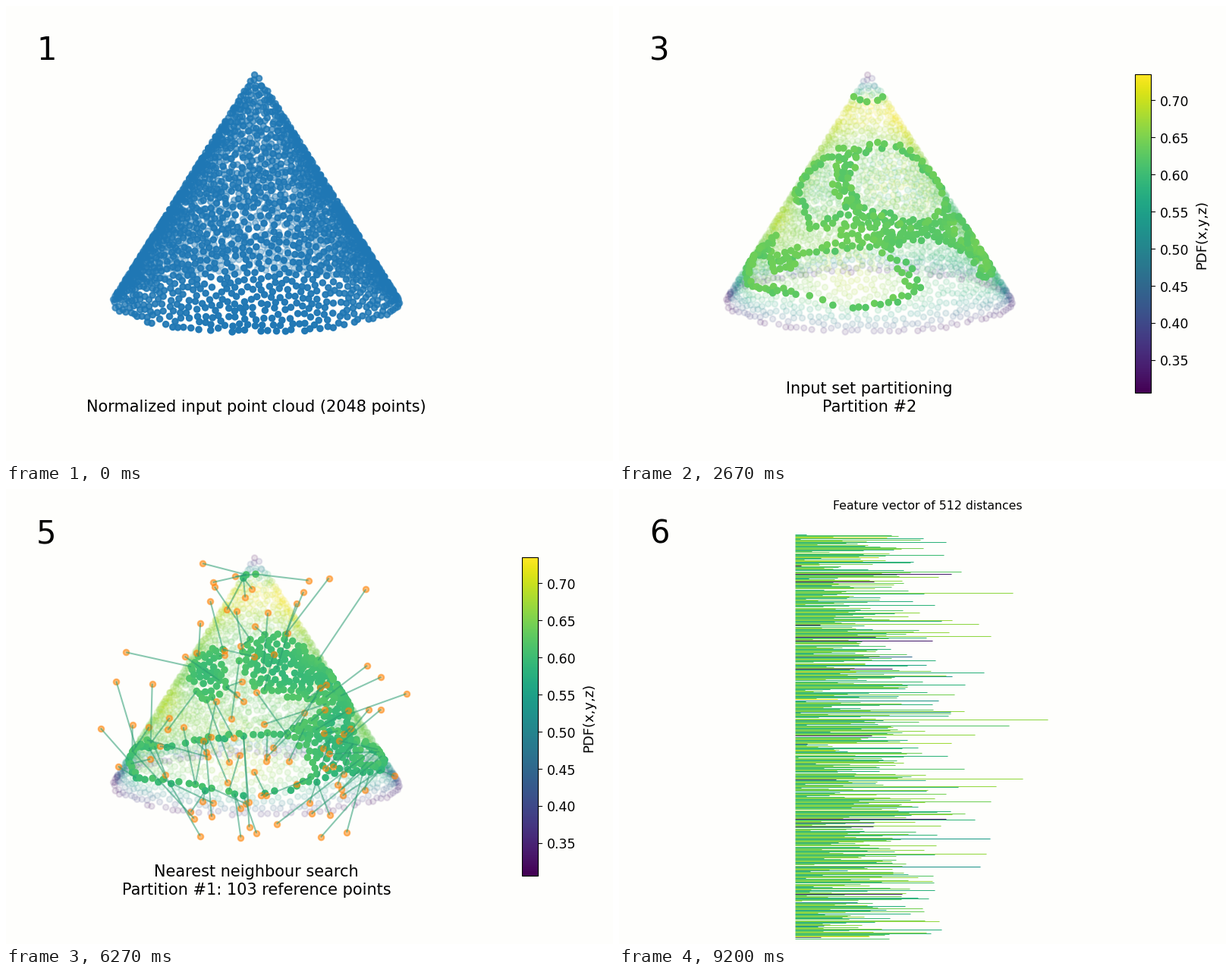
A matplotlib script that plays this animation: 800 by 600 pixels, repeating every 9270 ms.

```python
import numpy as np
import matplotlib.pyplot as plt
from matplotlib.animation import FuncAnimation
from matplotlib.collections import LineCollection
from matplotlib.colors import Normalize, to_rgba
from matplotlib.patches import Rectangle

W, H, DPI = 800, 600, 100
FRAMES, INTERVAL = 206, 45
BACKGROUND = "#fefefc"
ORANGE = "#ff860c"
plt.rcParams["font.family"] = "DejaVu Sans"

N_POINTS, N_REFS, N_PARTS = 2048, 512, 5
SCALE, CENTER = 217, (329.5, 293)
ELEV = np.radians(12.2)
RADIUS, APEX_Z, BASE_Z = 0.872, 0.968, -0.462
MIN_GAP = 0.035
PDF_MIN, PDF_MAX = 0.306, 0.735
DOT = dict(s=29, linewidths=1.5)

# When each scene begins (ms): input, density, partitions, references, searches, features
STARTS = [0, 800, 1420, 2030, 2640, 3250, 3860, 4530,
          5600, 6200, 6800, 7400, 8000, 8600]

# Denser and thinner spots on the cone: angle (deg), share of height below apex, gain, size
SPOTS = [(20, 0.20, 0.08, 0.16), (63, 0.52, 0.08, 0.18), (100, 0.74, 0.10, 0.18),
         (164, 0.65, 0.08, 0.16), (12, 0.77, 0.06, 0.10), (134, 0.50, -0.06, 0.22),
         (32, 0.68, -0.08, 0.18), (250, 0.70, 0.04, 0.22), (295, 0.55, -0.05, 0.25)]

cmap = plt.get_cmap("viridis")
norm = Normalize(PDF_MIN, PDF_MAX)
rng = np.random.default_rng(12)


def cone(angle, share):
    """Point on the side of the cone; x right, y towards the viewer, z up."""
    r = RADIUS * share
    z = APEX_Z + (BASE_Z - APEX_Z) * share
    return np.stack([r * np.cos(angle), r * np.sin(angle), z], axis=-1)


def project(p):
    x, y, z = p.T
    up = z * np.cos(ELEV) - y * np.sin(ELEV)
    return np.column_stack([CENTER[0] + SCALE * x, CENTER[1] - SCALE * up])


def depth(p):
    return p[:, 1] * np.cos(ELEV) + p[:, 2] * np.sin(ELEV)


def sq_dist(a, b):
    d = (a ** 2).sum(1)[:, None] + (b ** 2).sum(1) - 2 * a @ b.T
    return np.maximum(d, 0)


def sample_cone():
    """Random points on the cone that keep a small gap, ordered back to front."""
    kept = np.full((N_POINTS, 3), 9.0)
    n = 0
    while n < N_POINTS:
        p = cone(2 * np.pi * rng.random(), np.sqrt(rng.random()))
        if ((kept[:n] - p) ** 2).sum(1).min(initial=9) > MIN_GAP ** 2:
            kept[n] = p
            n += 1
    return kept[np.argsort(depth(kept))]


def sample_ball():
    v = rng.normal(size=(N_REFS, 3))
    v /= np.linalg.norm(v, axis=1, keepdims=True)
    r = np.cbrt((rng.permutation(N_REFS) + 0.5) / N_REFS)
    return v * r[:, None]


def estimate_density(p):
    cov = np.cov(p.T) * len(p) ** (-2 / 7)
    q = p @ np.linalg.inv(np.linalg.cholesky(cov)).T
    pdf = np.exp(-0.5 * sq_dist(q, q)).sum(1)
    pdf /= pdf.max()
    for angle, share, gain, size in SPOTS:
        spot = cone(np.radians(angle), share)
        pdf += gain * np.exp(-((p - spot) ** 2).sum(1) / (2 * size ** 2))
    pdf = (pdf - pdf.min()) / (pdf.max() - pdf.min())
    return PDF_MIN + (PDF_MAX - PDF_MIN) * pdf


points = sample_cone()
refs = sample_ball()
pdf = estimate_density(points)
colors = cmap(norm(pdf))
points_px, refs_px = project(points), project(refs)
parts = [np.sort(part) for part in np.array_split(np.argsort(pdf), N_PARTS)]
ref_sets = [np.arange(k, N_REFS, N_PARTS) for k in range(N_PARTS)]

nearest = np.zeros(N_REFS, dtype=int)
for part, own in zip(parts, ref_sets):
    nearest[own] = part[sq_dist(refs[own], points[part]).argmin(1)]
distances = np.linalg.norm(refs - points[nearest], axis=1)

fig = plt.figure(figsize=(W / DPI, H / DPI), dpi=DPI, facecolor=BACKGROUND)
ax = fig.add_axes([0, 0, 1, 1])
ax.axis("off")


def dots(px, color, zorder, **kw):
    return ax.scatter(px[:, 0], px[:, 1], c=color, zorder=zorder, **DOT, **kw)


def label(x, y, text, size, ha="center", **kw):
    return ax.text(x, y, text, fontsize=size, ha=ha, color="black", zorder=9,
                   **{"va": "baseline", **kw})


def caption(*lines):
    return [label(330, 534.7 - 23.3 * i, line, 15)
            for i, line in enumerate(reversed(lines))]


def step_number(n):
    return label(40, 71, str(n), 30, ha="left")


def make_colorbar():
    x0, x1, top, bottom = 680, 701, 90, 510
    ramp = np.linspace(1, 0, 256)[:, None]
    items = [ax.imshow(ramp, cmap=cmap, extent=(x0, x1, bottom, top),
                       aspect="auto", zorder=2),
             ax.add_patch(Rectangle((x0, top), x1 - x0, bottom - top, fill=False,
                                    ec="black", lw=0.8, zorder=3))]
    for value in np.arange(0.35, 0.71, 0.05):
        y = bottom - (bottom - top) * norm(value)
        items += ax.plot([x1, x1 + 5], [y, y], color="black", lw=0.8, zorder=3)
        items.append(label(712.5, y + 0.5, f"{value:.2f}", 12.5, ha="left",
                           va="center_baseline"))
    items.append(label(768, 301, "PDF(x,y,z)", 13, rotation=90, va="center"))
    return items


def make_bars():
    x0, top, bottom = 232, 59.5, 592.5
    y = np.linspace(top, bottom, N_REFS)
    x1 = x0 + 333 * distances / distances.max()
    rows = [[(x0, b), (a, b)] for a, b in zip(x1, y)]
    bars = LineCollection(rows, colors=colors[nearest], linewidths=0.75,
                          capstyle="butt", zorder=2)
    return ax.add_collection(bars)


def make_links(own):
    rows = np.stack([refs_px[own], points_px[nearest[own]]], axis=1)
    links = LineCollection(rows, colors=[to_rgba("#2a9c72", 0.55)],
                           linewidths=1.5, zorder=5)
    return ax.add_collection(links)


near = depth(points)
near = (near - near.min()) / (near.max() - near.min())
blue = np.tile(to_rgba("#1f77b4"), (N_POINTS, 1))
blue[:, 3] = 0.3 + 0.7 * near

shaded = dots(points_px, blue, 2)
solid = dots(points_px, colors, 2)
faint = dots(points_px, colors, 2, alpha=0.12)
picked = [dots(points_px[part], colors[part], 3) for part in parts]
orange = dots(refs_px, ORANGE, 4, alpha=0.4)
colorbar = make_colorbar()
numbers = [step_number(n) for n in range(1, 7)]

scenes = [
    [shaded, numbers[0], *caption("Normalized input point cloud (2048 points)")],
    [solid, numbers[1], *colorbar, *caption("Density estimation (Gaussian KDE)")],
]
for k in range(N_PARTS):
    scenes.append([faint, picked[k], numbers[2], *colorbar,
                   *caption("Input set partitioning", f"Partition #{k}")])
scenes.append([solid, orange, numbers[3], *colorbar,
               *caption("Reference point cloud (orange) (512 points, radius = 1)")])
for k, own in enumerate(ref_sets):
    scenes.append([faint, picked[k], make_links(own),
                   dots(refs_px[own], ORANGE, 4, alpha=0.55),
                   numbers[4], *colorbar,
                   *caption("Nearest neighbour search",
                            f"Partition #{k}: {len(own)} reference points")])
scenes.append([make_bars(), numbers[5],
               label(407, 27, "Feature vector of 512 distances", 11.3)])

ax.set_xlim(0, W)
ax.set_ylim(H, 0)
every_artist = {artist for scene in scenes for artist in scene}


def update(i):
    scene = scenes[np.searchsorted(STARTS, i * INTERVAL, side="right") - 1]
    for artist in every_artist:
        artist.set_visible(False)
    for artist in scene:
        artist.set_visible(True)
    return scene


anim = FuncAnimation(fig, update, frames=FRAMES, interval=INTERVAL,
                     init_func=lambda: update(0), repeat=True, repeat_delay=0,
                     blit=False)
plt.show()
```
